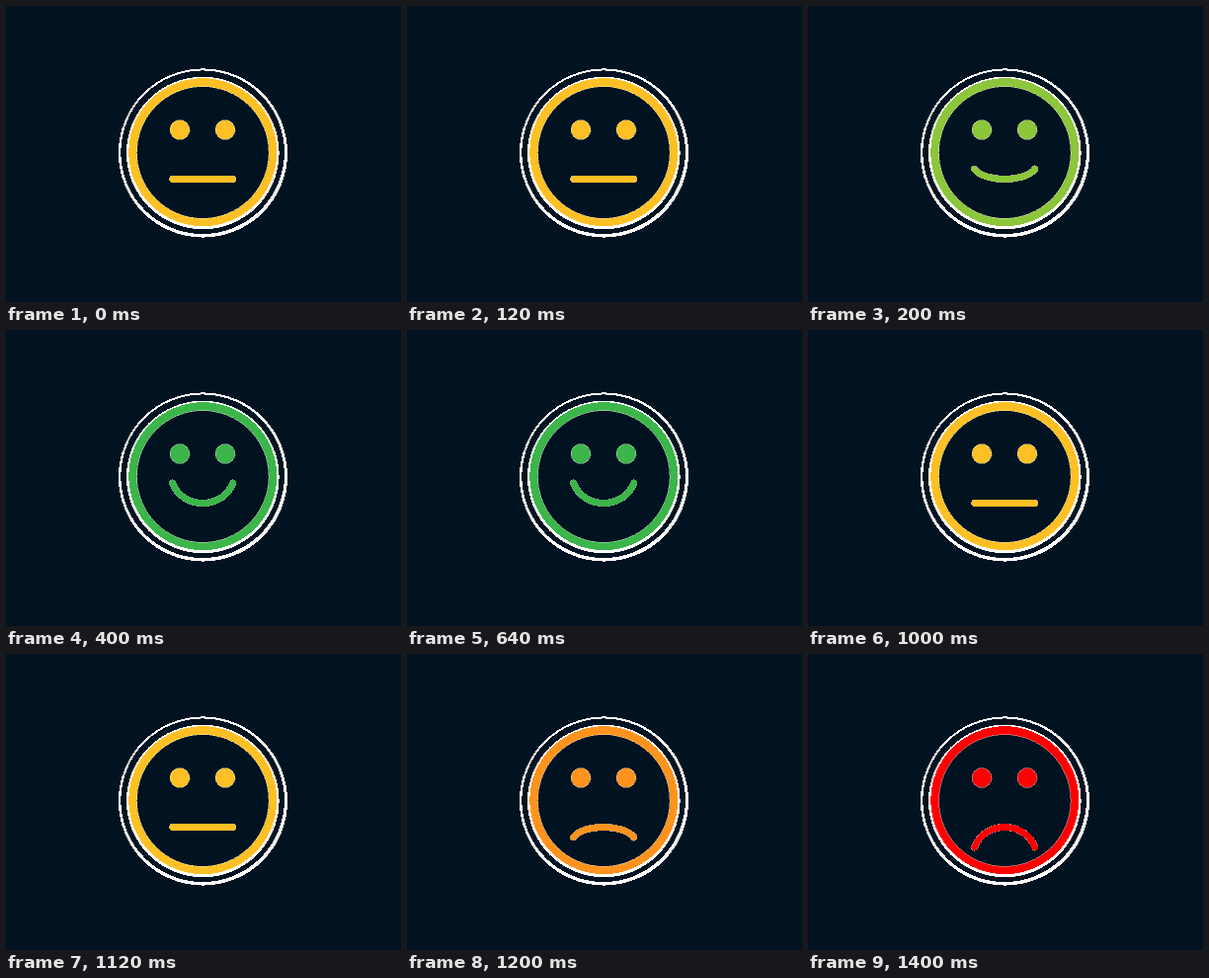
Recreate the animation shown at these times as an HTML page. Size 400x300 px, loop 1.6 s.

```html
<!DOCTYPE html>
<html lang="en">
<head>
<meta charset="utf-8">
<title>Mood face</title>
<style>
  html, body { margin: 0; width: 100%; height: 100%; overflow: hidden; background: #011221; }
  svg { display: block; width: 400px; height: 300px; shape-rendering: crispEdges; }
  .edge { stroke: #fff; stroke-opacity: .6; stroke-width: .6; }
</style>
</head>
<body>
<svg viewBox="0 0 400 300">
  <g fill="#011221">
    <circle cx="199.5" cy="149" r="85.6" fill="#fff"/>
    <circle cx="199.1" cy="148.2" r="82.8"/>
    <circle cx="199.3" cy="149" r="77.3" fill="#fff"/>
    <circle cx="199.3" cy="148.2" r="75" fill="currentColor"/>
    <circle class="edge" cx="199.3" cy="148.5" r="66.8"/>
  </g>
  <g class="edge" fill="currentColor">
    <circle cx="176" cy="125.5" r="10"/>
    <circle cx="222" cy="125.5" r="10"/>
  </g>
  <g fill="none" stroke-linecap="round">
    <path class="mouth" stroke="#fff" stroke-opacity=".6" stroke-width="7.2"/>
    <path class="mouth" stroke="currentColor" stroke-width="6.6"/>
  </g>
</svg>
<script>
  const STEP = 200;
  const MOODS = [0, 1, 2, 2, 1, 0, -1, -2];
  const COLORS = { "-2": "#ff0000", "-1": "#ff931e", 0: "#fec024", 1: "#8cc63a", 2: "#3cb54a" };
  const svg = document.querySelector("svg");
  const mouths = document.querySelectorAll(".mouth");

  // The middle of the mouth stays put while its ends rise or drop.
  function mouthPath(mood) {
    const width = 61, lean = 10, sag = mood * 10.2, pull = sag * 4 / 3;
    return `M${199.2 - width / 2} ${175.5 - sag}c${lean} ${pull} ${width - lean} ${pull} ${width} 0`;
  }

  function draw() {
    const mood = MOODS[Math.floor(performance.now() / STEP) % MOODS.length];
    svg.style.color = COLORS[mood];
    for (const mouth of mouths) mouth.setAttribute("d", mouthPath(mood));
    requestAnimationFrame(draw);
  }
  draw();
</script>
</body>
</html>
```
